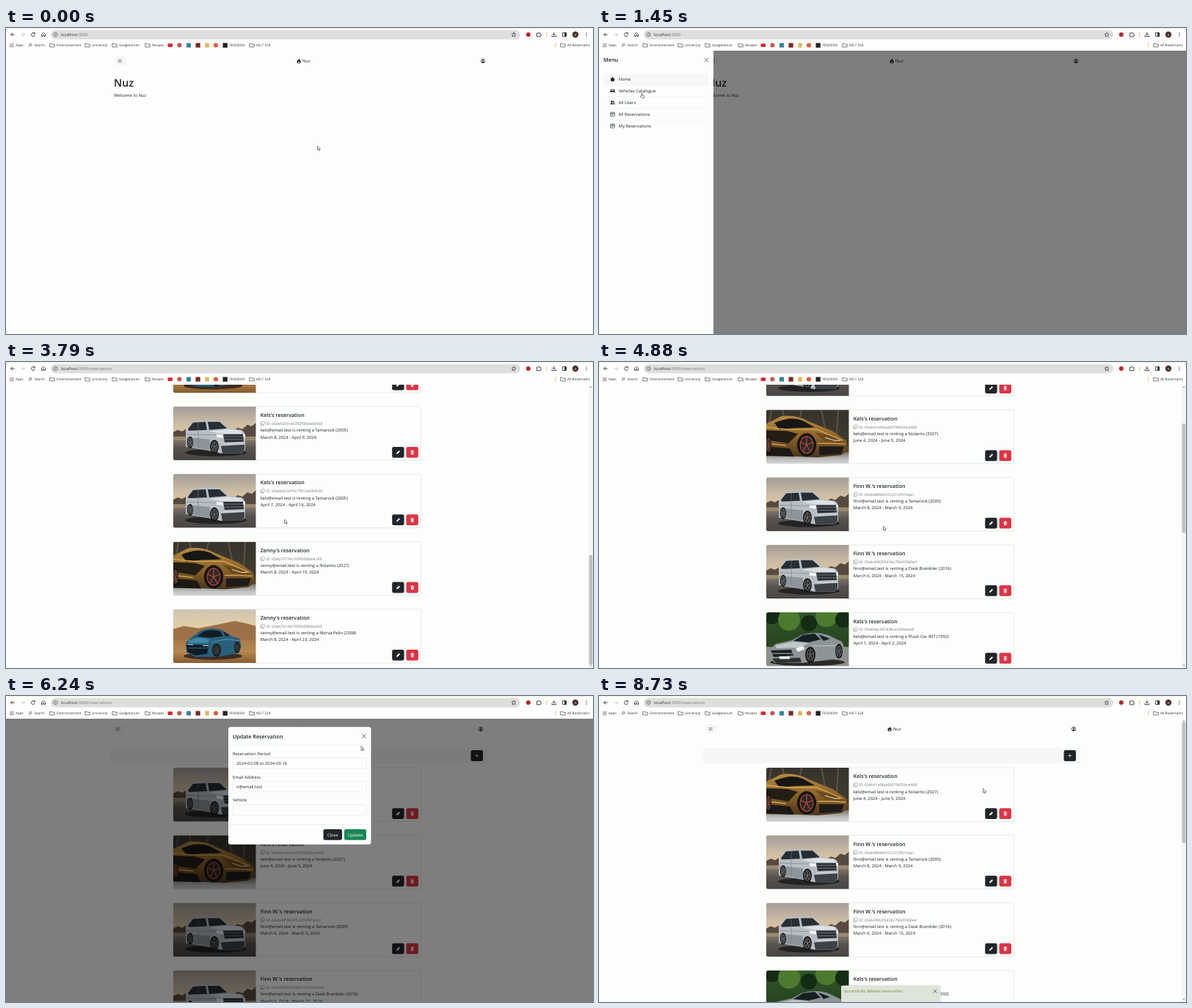
Recreate the animation shown at these times as an HTML page. Size 800 by 418 pixels, loop 8760 ms.

```html
<!DOCTYPE html>
<html lang="en">
<head>
<meta charset="utf-8">
<title>Reservation demo</title>
<style>
html, body { margin: 0; width: 100%; height: 100%; overflow: hidden; background: #fcfefc; }
svg { display: block; }
#stage { width: 100vw; height: 100vh; }
text { font-family: "Open Sans", "Noto Sans", sans-serif; text-rendering: geometricPrecision; white-space: pre; }
</style>
</head>
<body>
<svg id="stage" viewBox="0 0 800 418" xmlns="http://www.w3.org/2000/svg"></svg>
<script>
const LOOP = 8760, PAGE = '#fcfefc', INK = '#212529', TOP = 31, VIEW = 387;
const PITCH = 92.3, FIRST = 98, IMG_W = 112.5, CARD_H = 73.5;

const rect = (x, y, w, h, fill, r = 0, extra = '') =>
  `<rect x="${x}" y="${y}" width="${w}" height="${h}" rx="${r}" fill="${fill}" ${extra}/>`;
const circle = (x, y, r, fill, extra = '') => `<circle cx="${x}" cy="${y}" r="${r}" fill="${fill}" ${extra}/>`;
const ellipse = (x, y, rx, ry, fill, extra = '') => `<ellipse cx="${x}" cy="${y}" rx="${rx}" ry="${ry}" fill="${fill}" ${extra}/>`;
const shape = (d, fill, extra = '') => `<path d="${d}" fill="${fill}" ${extra}/>`;
const line = (d, color = INK, w = .8) => `<path d="${d}" fill="none" stroke="${color}" stroke-width="${w}"/>`;
const text = (x, y, size, str, fill = INK, weight = 400, anchor = 'start') =>
  `<text x="${x}" y="${y}" font-size="${size}" fill="${fill}" font-weight="${weight}" text-anchor="${anchor}">${str}</text>`;
const at = (x, y, body, id = '') => `<g ${id && `id="${id}"`} transform="translate(${x} ${y})">${body}</g>`;
const cross = (x, y, r = 2.8) => line(`M${x - r} ${y - r}l${2 * r} ${2 * r}m0 ${-2 * r}l${-2 * r} ${2 * r}`, '#444');
const gradient = (id, ...stops) => `<linearGradient id="${id}" x2="0" y2="1">` +
  stops.map(([o, c]) => `<stop offset="${o}" stop-color="${c}"/>`).join('') + '</linearGradient>';

// Icons, drawn around 0,0
const icons = {
  flame: shape('M.2-3.4C.7-1.8 2.6-1 2.6.9A2.6 2.5 0 0 1-2.6.9C-2.6-.4-1.8-1-1.6-1.8Q-1-1.3-.8-.7C.1-1.5.3-2.4.2-3.4Z', INK) +
    shape('M.1.2Q1.2 1.4.8 2.4A1 .8 0 0 1-.9 2.2Q-.9 1.2.1.2Z', PAGE),
  user: circle(0, 0, 2.8, 'none', `stroke="${INK}" stroke-width=".7"`) + circle(0, -.6, 1.1, INK) +
    shape('M-2.1 1.7Q0-.4 2.1 1.7Q0 3.4-2.1 1.7Z', INK),
  burger: rect(-6.5, -6, 15, 12, '#f6f7f5', 2) + line('M-2.4-1.7h5M-2.4 0h5M-2.4 1.7h5', '#555', .6),
  folder: line('M-3.2 2.3v-4.6h2.4l.8.9h3.2v3.7z', '#444', .7),
  pencil: shape('M-2.6 2.6L-2 .7L1.2-2.5L2.6-1.1L-.6 2.1Z', '#fff'),
  trash: rect(-2.2, -2.4, 4.4, .9, '#fff') + rect(-.8, -3, 1.6, .7, '#fff') +
    shape('M-1.9-1.1h3.8l-.3 4h-3.2z', '#fff') + line('M-.6-.4v2.6M.6-.4v2.6', '#dc3545', .4),
  copy: rect(-1.4, -2.7, 4, 4, 'none', .7, 'stroke="#777" stroke-width=".5"') + line('M-1.6-1.2h-1v3.9h3.9v-1', '#777', .5),
  home: shape('M-3.3 0L0-3L3.3 0H2.4V2.8H-2.4V0Z', INK),
  car: shape('M-3.2 2.4V0L-2.1-2.1H2.1L3.2 0V2.4H2V1.5H-2V2.4Z', INK) + rect(-1.7, -1.4, 3.4, 1.1, PAGE),
  users: circle(-1, -1.3, 1.3, INK) + circle(1.5, -1.1, 1, INK) + shape('M-3.3 2.3Q-3 .3-1 .3T1.2 2.3ZM1.6 2.3Q1.6 1 1 .4Q3.2 0 3.3 2.3Z', INK),
  calendar: rect(-2.8, -2.6, 5.6, 5.3, 'none', .7, `stroke="${INK}" stroke-width=".6"`) + line('M-2.8-1.1h5.6M-1.8 1.4Q0-.9 1.8.3', INK, .7)
};
const icon = (name, x, y) => at(x, y, icons[name]);

// Dark tyre with a thin rim and five spokes
function wheel(x, y, rx, ry, rim, w = .8) {
  const spokes = [0, 1, 2, 3, 4].map(i => {
    const a = (i * 72 - 90) * Math.PI / 180;
    return `M${x} ${y}L${(x + rx * .66 * Math.cos(a)).toFixed(2)} ${(y + ry * .7 * Math.sin(a)).toFixed(2)}`;
  }).join('');
  return ellipse(x, y, rx, ry, '#141414') + ellipse(x, y, rx * .68, ry * .72, '#2b2827', `stroke="${rim}" stroke-width="${w}"`) + line(spokes, rim, w);
}

const photos = {
  suv: rect(0, 0, 113, 47, 'url(#dusk)') +
    shape('M0 35L6 32L12 34L17 31V43H0ZM80 34L88 29L94 31L101 25L107 27L113 22V43H80Z', '#564a40') +
    rect(0, 41, 113, 7, '#9c8a6d') + rect(0, 46, 113, 28, 'url(#asphalt)') +
    ellipse(58, 63, 42, 5, '#232323') +
    shape('M17 39L19 30L26 21Q44 17 64 20L75 30L92 32Q98 34 98 41V59L93 64H65L52 61L17 55Z', '#b7bec4') +
    shape('M20 31L27 22L44 21L46 32L21 33ZM47 21L63 21L73 30L49 32Z', '#262d34') +
    shape('M48 34L74 31L92 33L95 37L66 37Z', '#dce2e6') +
    shape('M18 42L50 45V60L18 54Z', '#8d959b') + line('M18 38L58 39M34 22V55', '#737b81', .6) +
    shape('M68 38L95 38L96 48L70 49Z', '#2b3034') + line('M69 41h26M70 45h26', '#8b9399', .7) +
    shape('M59 38l9 1v4l-9-1zM95 38l3 0v4l-2 0z', '#f3f6f7') + shape('M65 54l32-2v7l-4 5H67z', '#3d4246') +
    line('M68 51h28', '#ccd2d6', 1.6) + wheel(56, 55, 6, 9.5, '#7c8488') + wheel(23, 49, 4, 8, '#747c80'),
  gold: rect(0, 0, 113, 74, 'url(#wood)') +
    line('M7 0l-4 24M22 0l3 14M48 0l-2 11M75 0l5 25M98 0l-2 34', '#5a5347', 2) +
    rect(0, 58, 113, 16, 'url(#snow)') +
    shape('M0 19L20 9Q40 6 58 16L90 29L109 42L112 55L102 62L70 65L0 62Z', 'url(#bronze)') +
    shape('M11 18Q33 8 50 15L66 24L38 25L18 27Z', '#161614') +
    shape('M0 28L29 29L43 33L30 46L0 41Z', '#241d14') + shape('M0 50L32 53L38 64L0 63Z', '#1c1915') +
    shape('M66 31L92 36L104 45L80 43Z', '#6c4a20') + shape('M72 50L106 50L102 60L72 62Z', '#1d1b18') +
    line('M0 24L30 27L69 27L104 42M0 46L27 49M70 46L88 46L108 47', '#d9a954', 1.3) + line('M80 38l13 4 8 0', '#f0e0b4', 1) +
    wheel(55, 48, 13, 16, '#b8483a', 1.2) + wheel(3, 48, 4, 13, '#8e4939'),
  blue: rect(0, 0, 113, 74, 'url(#desert)') +
    shape('M0 27L14 23L34 26L60 21L84 16L98 19L113 23V48H0Z', '#9d7148') +
    rect(0, 42, 113, 32, 'url(#sand)') + ellipse(54, 64, 40, 5, '#3c2c20') +
    shape('M17 46L25 38L36 30Q49 24 66 28L78 36L90 40L93 51L89 60L60 65H30L18 59Z', '#28607c') +
    shape('M32 37L42 30Q53 27 64 30L68 37L50 39Z', '#111d25') + shape('M68 30L78 36L71 37Z', '#172932') +
    shape('M20 43L33 39L50 41L47 46L22 46Z', '#4089a8') + line('M52 45L72 41L90 43', '#579ab4', .9) +
    shape('M18 48L45 49L48 53L46 61L30 63L19 58Z', '#0f1a21') + line('M20 53h27', '#28607c', 1.3) +
    line('M19 48l8 .6M40 49.500l7 .5', '#d5e2e5', 1) + wheel(59, 56, 6, 9, '#3d4549') + wheel(87, 52, 4, 8, '#3d4549'),
  silver: rect(0, 0, 113, 74, 'url(#forest)') +
    [8, 31, 58, 82, 105].map((x, i) => circle(x, 5 + i % 3 * 5, 11 + i % 2 * 4, i % 2 ? '#4e7a30' : '#142c14')).join('') +
    rect(0, 46, 113, 28, '#8d8e88') + rect(0, 40, 113, 7, '#2c4623') + ellipse(56, 68, 51, 5, '#2a2b28') +
    shape('M4 51L13 43L35 38L48 31Q68 25 84 31L103 40L108 53L102 63L50 69L12 69L4 62Z', '#8c9496') +
    shape('M37 39L50 31L66 29L74 37L58 41ZM71 30L87 36L78 39Z', '#172020') +
    shape('M12 45L37 40L58 42L46 48L14 49Z', '#c0c7c9') + shape('M6 52L34 51L37 59L10 61Z', '#1b2021') +
    line('M7 56h29M62 46L104 45', '#c5cccd', .9) + shape('M40 49l10-3 3 4-10 4z', '#eef2f2') +
    shape('M8 63L46 62L48 68L13 69Z', '#2b3031') + rect(18, 60, 14, 3.6, '#f1f1ec') +
    wheel(60, 58, 7, 11, '#737a7d') + wheel(99, 53, 5, 10, '#737a7d')
};

const KELS = ['Kels', 'kels'], FINN = ['Finn W.', 'finn'], ZENNY = ['Zenny', 'zenny'];
const bookings = [
  [['Norman', 'n'], '65eb2cd04be87738dbe13f6', 'Dask Foxmare (2016)', 'March 8, 2024 - March 16, 2024', 'suv'],
  [KELS, '65eb41e96ad2479b02bce468', 'Nolantis (2027)', 'June 4, 2024 - June 5, 2024', 'gold'],
  [FINN, '65eb48fdc037c2212f916aa1', 'Tamarock (2005)', 'March 8, 2024 - March 9, 2024', 'suv'],
  [FINN, '65eb498295434c796455b6e4', 'Dask Brambler (2016)', 'March 6, 2024 - March 15, 2024', 'suv'],
  [KELS, '65eb4ac347d38ca2a90eee8', 'Plush Car 407 (1992)', 'April 1, 2024 - April 2, 2024', 'silver'],
  [KELS, '65eb4f1d47d38ca2a90ef02', 'Morva Pelin (2008)', 'March 8, 2024 - March 12, 2024', 'blue'],
  [KELS, '65eb520cca6392f0b0e6846d', 'Tamarock (2005)', 'March 8, 2024 - April 9, 2024', 'suv'],
  [KELS, '65eb62c3470c7fb12e069536', 'Tamarock (2005)', 'April 7, 2024 - April 16, 2024', 'suv'],
  [ZENNY, '65eb70774c70f9fd3866e169', 'Nolantis (2027)', 'March 8, 2024 - April 19, 2024', 'gold'],
  [ZENNY, '65eb74144c70f9fd3866e249', 'Morva Pelin (2008)', 'March 8, 2024 - April 23, 2024', 'blue']
];

const card = ([[name, mail], id, car, dates, photo], i) => at(228, FIRST + i * PITCH,
  rect(0, 0, 337.5, CARD_H, PAGE, 2.5, 'stroke="#d9dcd9" stroke-width=".6"') +
  `<use href="#${photo}" width="${IMG_W}" height="${CARD_H}" clip-path="url(#rounded)"/>` +
  text(118.7, 14.4, 7.1, `${name}'s reservation`, INK, 600) + icon('copy', 121.6, 23.3) +
  text(126, 25.3, 5.2, `ID: ${id}`, '#777b7e') +
  text(118.7, 34.5, 5.8, `${mail}@email.test is renting a ${car}`) +
  text(118.7, 43.8, 5.8, dates) +
  rect(298.2, 55.2, 16.4, 14.8, INK, 2.3) + icon('pencil', 306.4, 62.6) +
  rect(317.5, 55.2, 16.4, 14.8, '#dc3545', 2.3) + icon('trash', 325.7, 62.7), `card${i}`);

const nav = dx => at(dx, 0, icon('burger', 155, 45) + icon('flame', 399, 45) +
  text(404, 47.3, 5.8, 'Nuz') + icon('user', 650, 45));

const home = `<g id="home">${nav(0)}${text(147, 80.3, 14.3, 'Nuz', INK, 600)}${text(147, 93.7, 5.8, 'Welcome to Nuz')}</g>`;
const listing = `<g id="listing">${nav(-3)}${rect(142, 71, 514, 21, '#f5f7f5', 1)}` +
  rect(633.5, 74, 16.5, 15, INK, 2.3) + line('M639.4 81.5h4.6m-2.3-2.3v4.6', '#fff', .7) +
  `<g id="cards">${bookings.map(card).join('')}</g></g>`;

const scrollbar = `<g id="scrollbar">${rect(794, TOP, 6, VIEW, '#f4f6f4')}` +
  shape('M795.7 35l1.3-1.7 1.3 1.7zM795.7 413.8l1.3 1.7 1.3-1.7z', '#777') +
  '<rect id="thumb" x="794.7" width="4.6" fill="#bfc1bf"/></g>';

const menuItems = [['home', 'Home'], ['car', 'Vehicles Catalogue'], ['users', 'All Users'],
  ['calendar', 'All Reservations'], ['calendar', 'My Reservations']];
const menu = `<g id="menu">${rect(0, TOP, 156, VIEW, PAGE)}${text(6, 46.4, 7.3, 'Menu', INK, 600)}${cross(146.5, 43.5)}` +
  rect(7, 62.5, 142, 15, '#f7f8f6') +
  menuItems.map(([name, label], i) => at(0, i * 15.95, icon(name, 18.5, 70) + text(26.7, 72.2, 5.8, label) +
    (i < 4 ? line('M7 78h142', '#e6e9e6', .5) : ''))).join('') + '</g>';

const field = (y, label, value) => text(309, y, 5.8, label) +
  rect(309, y + 4, 182, 14.5, PAGE, 1.5, 'stroke="#e3e6e3" stroke-width=".6"') + text(314, y + 13.4, 5.8, value);
const modal = `<g id="modal">${rect(303, 42.3, 194.5, 160.5, PAGE, 3)}${text(309, 58, 7.2, 'Update Reservation', INK, 600)}${cross(488, 54.8)}` +
  line('M303 67.2h194.5M303 175.5h194.5', '#e3e6e3', .6) +
  field(80.7, 'Reservation Period', '2024-03-08 to 2024-03-16') + field(112.6, 'Email Address', 'n@email.test') + field(144.4, 'Vehicle', '') +
  rect(432.5, 182, 25.5, 14.7, INK, 2.3) + text(445.3, 191.5, 5.8, 'Close', '#fff', 400, 'middle') +
  rect(461, 182, 30, 14.7, '#198754', 2.3) + text(476, 191.5, 5.8, 'Update', '#fff', 400, 'middle') + '</g>';

const toast = `<g id="toast">${rect(328.5, 394.5, 138, 24, '#000', 2, 'opacity=".06"')}${rect(330, 395.5, 135.5, 22.5, '#dfe4da', 2)}` +
  text(333, 405.4, 5.4, 'Successfully deleted reservation.', '#7d8732') + cross(458, 403.3, 2.4) + '</g>';

const label = (x, str) => text(x, 25.3, 4.6, str, '#333');
const bookmark = ([x, str]) => icon('folder', x, 23.6) + label(x + 6, str);
const toolbar = line('M11.7 9h-5m2.2-2.3L6.6 9l2.3 2.3', '#333', .9) + line('M20.4 9h5m-2.2-2.3L25.5 9l-2.3 2.3', '#bbb') +
  line('M39 7.4A2.5 2.5 0 1 0 39.5 9.5M39.4 6.2v1.8h-1.8', '#333', .9) +
  line('M48.5 11.6V8.4L51 6.3L53.5 8.4V11.6H51.9V9.6H50.1V11.6Z', '#333') +
  rect(61, 2.8, 640, 12.6, '#dcdfdc', 6.3) + circle(67.5, 9, 2.6, 'none', 'stroke="#444" stroke-width=".7"') +
  line('M67.5 8.6v1.8M67.5 7.3v.6', '#444', .7) +
  '<text x="75" y="11" font-size="5.4" fill="#333">localhost<tspan fill="#777">:3000<tspan id="path"></tspan></tspan></text>' +
  line('M692 6l.9 2 2.1.2-1.6 1.5.5 2.1-1.9-1.1-1.9 1.1.5-2.1L689 8.2l2.1-.2z', '#333', .7) +
  circle(711.8, 9, 3, '#b62626') + line('M723.4 7.2h1.6a1 1 0 0 1 2 0h1.5v1.6a1 1 0 0 1 0 2v1h-5.1z', '#333', .9) +
  rect(736.2, 6, 1, 6, '#f2c36a') + line('M746.8 5.7v3.9m-1.9-1.7l1.9 1.9 1.9-1.9M744 10v1.7h5.6V10', '#333', .9) +
  rect(758.4, 6.4, 5.2, 5.2, 'none', .5, 'stroke="#333" stroke-width=".9"') + rect(761.2, 6.4, 2.4, 5.2, '#222') +
  circle(776, 9, 4.2, '#4d302b') + text(776, 10.6, 4.3, 'A', '#eee', 400, 'middle') +
  [6.8, 9, 11.2].map(y => circle(791, y, .65, '#333')).join('');
const appsGrid = [0, 1, 2].map(r => [0, 1, 2].map(c =>
  rect(5.3 + c * 1.9, 21.2 + r * 1.9, 1.2, 1.2, ['#b55', '#575', '#557'][(r + c) % 3])).join('')).join('');
const bookmarks = appsGrid + label(13, 'Apps') + label(38.4, 'Search') + label(304.5, 'FE000000') +
  circle(33.5, 22.9, 1.5, 'none', 'stroke="#444" stroke-width=".7"') + line('M32.4 24l-1.7 1.7', '#444') +
  [[63, 'Entertainement'], [111, 'University'], [148, 'Gadgetarium'], [193, 'Recipes'], [335, 'KELT 528'], [759, 'All Bookmarks']].map(bookmark).join('') +
  rect(220.5, 21.2, 6.5, 4.8, '#dc2430', 1) + circle(236.3, 23.5, 3, '#c9544e') + rect(246, 20.6, 6, 6, '#397fa0') +
  rect(258.5, 20.5, 6.2, 6.2, '#7b2a23') + rect(271.3, 20.6, 5.5, 6, '#dfb859') + circle(286, 23.5, 3.1, '#db6236') +
  rect(295.5, 20.5, 6.3, 6.3, '#202020') + rect(748.3, 20.5, 1, 6, '#f2c36a');
const chrome = rect(0, 0, 800, TOP, '#fdfefd') + rect(0, 0, 800, .8, '#eef0cd') + toolbar + bookmarks;

const OUTLINE = 'stroke="#222" stroke-width=".55"';
const cursor = '<g id="cursor">' +
  shape('M0 0V5.7L1.3 4.5L2.2 6.5L3.2 6L2.3 4.1H4.1Z', '#fff', `id="arrow" ${OUTLINE}`) +
  shape('M-.6.4Q0-.5.5.4V2.8L3 3.3Q3.7 3.7 3.3 5L2.8 6.8H-.2L-2 4.3Q-1.7 3.5-.6 4.3Z', '#fff', `id="hand" ${OUTLINE}`) + '</g>';

const defs = '<defs>' + gradient('dusk', [0, '#a39d97'], [.5, '#cdbca6'], [.85, '#e2c59a'], [1, '#c9ab80']) +
  gradient('asphalt', [0, '#7d746b'], [.4, '#57524e'], [1, '#474443']) +
  gradient('wood', [0, '#37332c'], [1, '#47402f']) + gradient('snow', [0, '#77736e'], [.6, '#bfc0c0'], [1, '#d4d5d5']) +
  gradient('bronze', [0, '#b58a42'], [.5, '#8d6429'], [1, '#4a341a']) + gradient('desert', [0, '#cfc4b2'], [.35, '#e6cfa8'], [1, '#ab7a44']) +
  gradient('sand', [0, '#a87a4a'], [.5, '#b58850'], [1, '#83592f']) + gradient('forest', [0, '#31562a'], [1, '#1f3819']) +
  '<filter id="soft"><feGaussianBlur stdDeviation=".35"/></filter>' +
  `<clipPath id="rounded">${rect(0, 0, 120, CARD_H, '#000', 2.5)}</clipPath>` +
  Object.entries(photos).map(([id, art]) =>
    `<symbol id="${id}" viewBox="0 0 ${IMG_W} ${CARD_H}">${art.replace(/^<rect/, '<g filter="url(#soft)"><rect')}</g></symbol>`).join('') + '</defs>';

document.getElementById('stage').innerHTML = defs + rect(0, 0, 800, 418, PAGE) + home + listing + scrollbar +
  rect(0, TOP, 800, VIEW, '#000', 0, 'id="backdrop"') + menu + modal + toast + chrome + cursor;

const $ = id => document.getElementById(id);
const clamp = v => Math.max(0, Math.min(1, v));
const smooth = v => v * v * (3 - 2 * v);
const ramp = (t, from, length) => clamp((t - from) / length);
const show = (id, on) => $(id).setAttribute('display', on ? 'inline' : 'none');
const move = (id, x, y) => $(id).setAttribute('transform', `translate(${x} ${y})`);

// Interpolates rows of [time, ...values]
function track(keys, t, ease = smooth) {
  const i = keys.findIndex(k => k[0] > t);
  if (i < 0) return keys[keys.length - 1].slice(1);
  const a = keys[i - 1], b = keys[i], p = ease((t - a[0]) / (b[0] - a[0]));
  return a.slice(1).map((v, j) => v + (b[j + 1] - v) * p);
}

const pointer = [[0, 424.5, 161], [220, 424.5, 161], [720, 156, 45], [980, 156, 45], [1450, 58.5, 89], [1640, 52, 116],
  [1800, 52, 116], [2450, 379.5, 215], [4300, 379.5, 215], [4880, 387.5, 224], [5200, 410, 215], [5650, 534, 160],
  [5880, 534, 160], [6240, 484, 68.5], [6420, 488, 54], [7200, 488, 54], [7700, 553, 160], [8200, 553, 160], [8730, 523.5, 126.5]];
const scrolling = [[0, 0], [2550, 0], [3000, 230], [3600, 591], [4250, 591], [4880, 125.5], [5180, 0]];
const hovers = [[680, 1000], [1400, 1900], [5580, 5920], [6380, 7260], [7640, 8260]];
const OPEN_MENU = 820, CLICK_LINK = 1700, LOADED = 2050, EDIT = 5800, CLOSE = 7070, DELETE = 8330;

function draw(t) {
  const listed = t >= CLICK_LINK, deleted = t >= DELETE;
  const menuIn = smooth(ramp(t, OPEN_MENU, 300)) - smooth(ramp(t, CLICK_LINK, 300));
  const modalIn = smooth(ramp(t, EDIT + 80, 300)) - smooth(ramp(t, CLOSE, 300));
  const dim = ramp(t, OPEN_MENU, 150) - ramp(t, CLICK_LINK + 150, 150) + ramp(t, EDIT, 150) - ramp(t, CLOSE + 300, 150);
  const [scroll] = track(scrolling, t, v => v);

  show('home', !listed);
  show('listing', listed);
  show('cards', t >= LOADED);
  $('path').textContent = listed ? '/reservations' : '';
  move('listing', 0, -scroll);
  show('card0', !deleted);
  move('cards', 0, deleted ? -PITCH : 0);

  const pageHeight = 978 - (deleted ? PITCH : 0);
  show('scrollbar', t >= LOADED && dim < .01);
  $('thumb').setAttribute('y', 36 + 377 * scroll / pageHeight);
  $('thumb').setAttribute('height', 377 * VIEW / pageHeight);

  $('backdrop').setAttribute('opacity', dim * .5);
  show('menu', menuIn > 0);
  move('menu', -156 * (1 - menuIn), 0);
  $('modal').setAttribute('opacity', modalIn);
  move('modal', 0, -19.5 * (1 - modalIn));
  $('toast').setAttribute('opacity', smooth(ramp(t, DELETE + 60, 200)));

  move('cursor', ...track(pointer, t));
  const pointing = hovers.some(([from, to]) => t >= from && t < to);
  show('hand', pointing);
  show('arrow', !pointing);
}

const start = performance.now();
function tick() {
  draw((performance.now() - start) % LOOP);
  requestAnimationFrame(tick);
}
tick();
</script>
</body>
</html>
```
